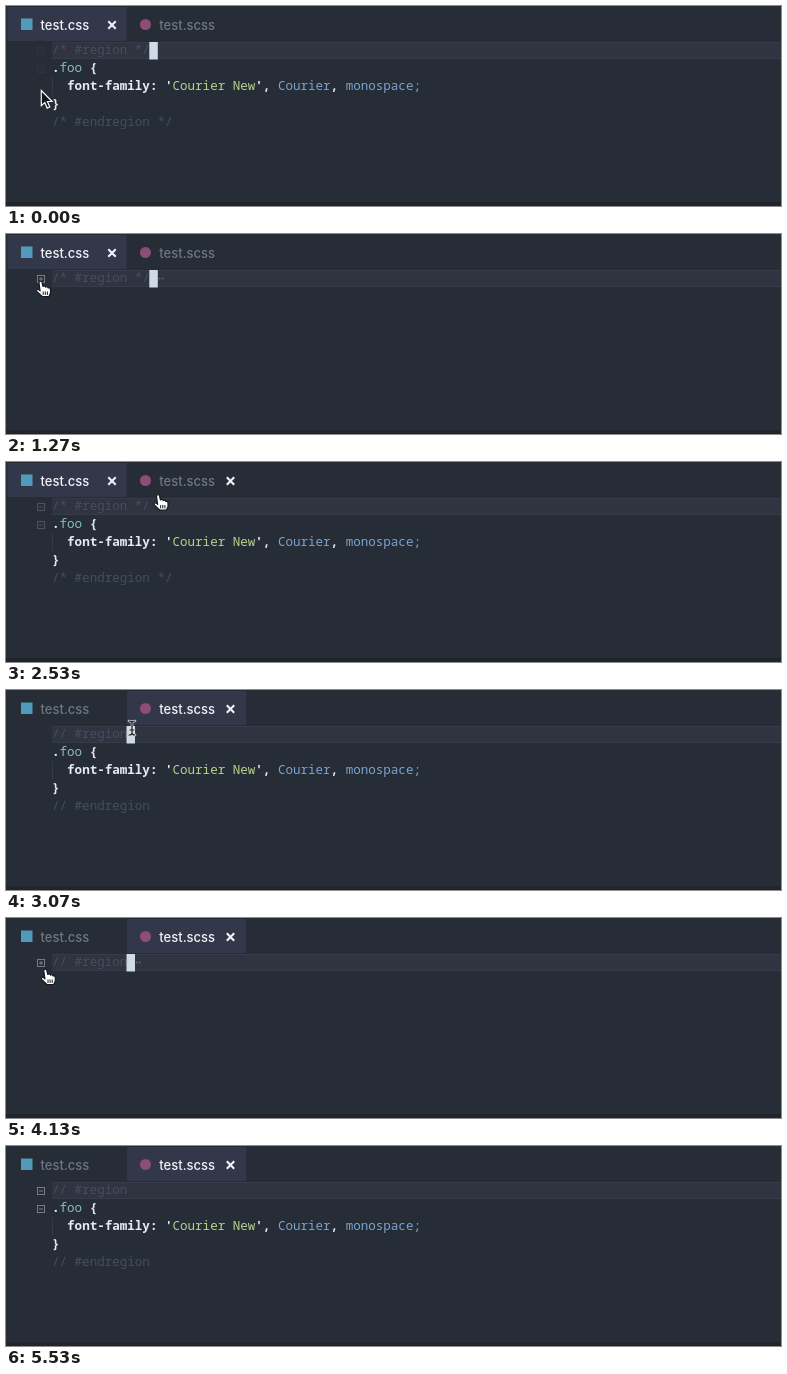
An HTML page for the animation above (5590 ms loop, 775 by 200 pixels).

```html
<!DOCTYPE html>
<html lang="en">
<head>
<meta charset="utf-8">
<title>Folding regions</title>
<style>
  html, body { margin: 0; width: 100%; height: 100%; overflow: hidden; background: #272d36; }
  svg { display: block; }
  .code { font: 500 12.55px 'Noto Sans Mono', 'DejaVu Sans Mono', monospace; white-space: pre; }
  .tab { font: 500 13px Inter, 'Open Sans', sans-serif; }
  .comment { fill: #464d61; }
  .plain { fill: #e4ebf3; font-weight: 600; }
  .name { fill: #86bdb7; }
  .string { fill: #b7d28e; }
  .value { fill: #7aa3cf; }
</style>
</head>
<body>
<svg width="775" height="200" viewBox="0 0 775 200">
  <rect width="775" height="200" fill="#272d36"/>
  <rect id="activeTab" y="1" height="34" fill="#323849"/>
  <rect x="15" y="12.5" width="11.5" height="11.5" fill="#519aba"/>
  <circle cx="139.5" cy="18.5" r="5.5" fill="#8d4d78"/>
  <text id="cssTab" class="tab" x="34.5" y="24">test.css</text>
  <text id="scssTab" class="tab" x="153.3" y="24">test.scss</text>
  <g stroke="#f1f4f8" stroke-width="2.1">
    <path id="cssClose" d="M102.3 15.3l7.4 7.4m0-7.4l-7.4 7.4"/>
    <path id="scssClose" d="M220.8 15.3l7.4 7.4m0-7.4l-7.4 7.4"/>
  </g>

  <rect x="46" y="36" width="729" height="17" fill="#2f3440"/>
  <path d="M46 36.5H775M46 52.5H775" stroke="#353b48"/>
  <text id="openComment" class="code comment" x="46" y="48"></text>
  <g id="body">
    <path d="M46.5 71v18" stroke="#343b47"/>
    <text class="code" x="46" y="66"><tspan class="plain">.</tspan><tspan class="name">foo</tspan><tspan class="plain"> {</tspan></text>
    <text class="code" x="61.1" y="84"><tspan class="plain">font-family: '</tspan><tspan class="string">Courier New</tspan><tspan class="plain">', </tspan><tspan class="value">Courier</tspan><tspan class="plain">, </tspan><tspan class="value">monospace;</tspan></text>
    <text class="code plain" x="46" y="102">}</text>
    <text id="endComment" class="code comment" x="46" y="120"></text>
  </g>
  <path id="dots" d="M0 44.5h1.5m1.5 0h1.5m1.5 0h1.5" stroke="#646c7c" stroke-width="1.6"/>
  <rect id="caret" y="36" width="8.5" height="17.5" fill="#d0d9e6"/>

  <g fill="none" stroke="#767c87">
    <g id="outerFold">
      <rect x="31.5" y="41.5" width="7" height="7"/>
      <path d="M33 45h4"/>
      <path id="plus" d="M35 43v4"/>
    </g>
    <g id="innerFold">
      <rect x="31.5" y="59.5" width="7" height="7"/>
      <path d="M33 63h4"/>
    </g>
  </g>

  <g id="pointer">
    <path id="arrow" d="M0 0V15.2L3.5 12l2.4 5.6 2.6-1.1L6.1 11h4.7Z" fill="#111419" stroke="#f4f6f8" stroke-width="1.2"/>
    <g id="hand" stroke="#15181d" stroke-linejoin="round">
      <path d="M-1.5 1.5C-1.5-.7 1.3-.8 1.6 1.2L2.4 5C3.4 4 5 4.4 5.2 5.6 6.3 4.9 7.5 5.4 7.8 6.5 9.1 6 10 6.8 10 8.2V11.5L8.5 15H1.6L-3.7 10C-4.8 8.4-3 7.1-1.6 8.4L-.4 9.4Z" fill="#fff" stroke-width="1.2"/>
      <path d="M2.7 10v3.4m2.1-3.4v3.4m2.1-3.4v3.4"/>
    </g>
    <g id="beam" fill="none" stroke-linecap="round">
      <path d="M-3-7Q0-7 0-5Q0-7 3-7M0-5V5M-3 7Q0 7 0 5Q0 7 3 7M-2 2H2" stroke="#dfe4ea" stroke-width="2.6"/>
      <path d="M-3-7Q0-7 0-5Q0-7 3-7M0-5V5M-3 7Q0 7 0 5Q0 7 3 7M-2 2H2" stroke="#14181e" stroke-width="1.2"/>
    </g>
  </g>
  <rect y="196" width="775" height="4" fill="#20252d"/>
</svg>
<script>
const LOOP = 5590;
const SWITCH_TAB = 2760;
const FOLDED = [[1180, 1560], [3820, 4500]];
const HIDE_POINTER = 5470;

// Fold marker opacity and pointer stops, each led by its time
const MARKERS = [[0, 0.1], [70, 0.1], [400, 1], [2360, 1], [2700, 0], [3420, 0], [3620, 1], [LOOP, 1]];
const PATH = [
  [0, 35.3, 84.5], [70, 35.3, 84.5], [540, 36, 108], [640, 36, 108], [1020, 34.5, 47.5],
  [2130, 34.5, 47.5], [2430, 152, 33], [2530, 152, 33], [2680, 156, 22],
  [2820, 156, 22], [3060, 126, 38], [3130, 126, 38], [3540, 39.3, 51.5], [LOOP, 39.3, 51.5]
];

const el = Object.fromEntries([...document.querySelectorAll('[id]')].map(n => [n.id, n]));
const show = (node, visible) => node.setAttribute('visibility', visible ? 'visible' : 'hidden');
const within = (t, spans) => spans.some(([from, to]) => t >= from && t < to);
const linear = k => k;
const smooth = k => k * k * (3 - 2 * k);

function sample(stops, t, ease) {
  const i = stops.findIndex(stop => stop[0] > t);
  const [t0, ...from] = stops[i - 1], [t1, ...to] = stops[i];
  const k = ease((t - t0) / (t1 - t0));
  return from.map((v, n) => v + (to[n] - v) * k);
}

function pointerShape(x, y) {
  if (y < 36) return 'hand';
  if (x > 46) return 'beam';
  return y < 55 ? 'hand' : 'arrow';
}

function render(t) {
  const scss = t >= SWITCH_TAB;
  const folded = within(t, FOLDED);
  const [x, y] = sample(PATH, t, smooth);
  const hoverScss = x > 120 && y < 36;
  const caretX = scss ? 120.5 : 143.3;

  el.activeTab.setAttribute('x', scss ? 121 : 1.5);
  el.activeTab.setAttribute('width', 119);
  el.cssTab.setAttribute('fill', scss ? '#6f7685' : '#f1f4f8');
  el.scssTab.setAttribute('fill', scss ? '#f1f4f8' : '#6f7685');
  show(el.cssClose, !scss);
  show(el.scssClose, scss || hoverScss);

  el.openComment.textContent = scss ? '// #region' : '/* #region */';
  el.endComment.textContent = scss ? '// #endregion' : '/* #endregion */';
  show(el.body, !folded);
  show(el.dots, folded);
  el.dots.setAttribute('transform', `translate(${caretX + 6.5})`);
  el.caret.setAttribute('x', caretX);
  show(el.caret, (t + 600) % 1000 >= 500);

  const [opacity] = sample(MARKERS, t, linear);
  el.outerFold.setAttribute('opacity', opacity);
  el.innerFold.setAttribute('opacity', opacity);
  show(el.plus, folded);
  show(el.innerFold, !folded);

  const shape = pointerShape(x, y);
  for (const name of ['arrow', 'hand', 'beam']) show(el[name], name === shape && t < HIDE_POINTER);
  el.pointer.setAttribute('transform', `translate(${x} ${y})`);
}

const start = performance.now();
function tick() {
  render(Math.max(0, performance.now() - start) % LOOP);
  requestAnimationFrame(tick);
}
tick();
</script>
</body>
</html>
```
